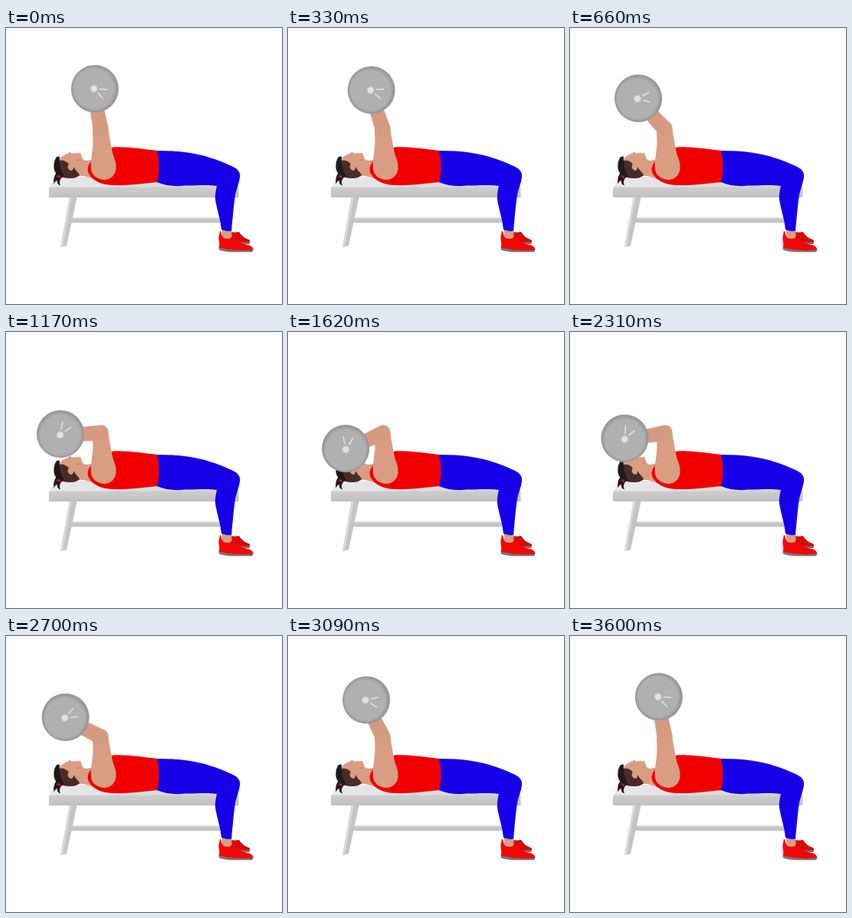
An HTML page that plays this animation: 360x360 px, repeating every 3630 ms.

```html
<!DOCTYPE html>
<html lang="en">
<head>
<meta charset="utf-8">
<title>Lying triceps extension</title>
<style>
html, body { margin: 0; width: 100%; height: 100%; overflow: hidden; background: #fff; }
svg { display: block; width: 100vw; height: 100vh; }
</style>
</head>
<body>
<svg viewBox="0 0 360 360">
  <defs>
    <linearGradient id="pad" x1="0" y1="0" x2="1" y2="0">
      <stop offset="0" stop-color="#e9e9e9"/><stop offset="1" stop-color="#d2d2d2"/>
    </linearGradient>
    <linearGradient id="edge" x1="0" y1="0" x2="0" y2="1">
      <stop offset="0" stop-color="#cdcdcd"/><stop offset="1" stop-color="#c0c0c0"/>
    </linearGradient>
  </defs>

  <g id="bench">
    <path fill="#c4c4c4" d="M84 247H281V254H84Z"/>
    <path fill="#dadada" d="M86 247H281V249H86Z"/>
    <path fill="#c4c4c4" d="M83 219H93L79 284L71 286Z"/>
    <path fill="#dadada" d="M83 219H86L74 285L71 286Z"/>
    <path fill="url(#pad)" d="M56 208L66 194H294L303 208Z"/>
    <path fill="url(#edge)" d="M56 207.500H303.500V221H56Z"/>
  </g>

  <g id="head">
    <path fill="#d99d82" d="M69 173C71 168 75 166 80 164L83.500 161.500L86 163.500L97 163L98.500 167L100 171C103 174 108 173 114 171L119 176L114 197C106 194 100 192 94 193L80 188Z"/>
    <path fill="#4a2c27" d="M69 173C75 172 80 174 82 178C79 180 81 186 86 186C88 184 88 182 89 181C89 185 94 187 96 192C92 196.500 82 197 75 195C69 191 66 180 69 173Z"/>
    <path fill="#1c1a1d" d="M66 189C62 193 62 199 62.500 203.500C64 200 65.500 199 67 199C66 202 68 204.500 71 205.500C69 201 70 197 74 194Z"/>
    <path fill="#1c1a1d" d="M66 168L70 167.500C69 178 71 186 77 194C70 196 64 191 62.500 183C62 177 63 172 66 168Z"/>
    <path fill="#d90d12" d="M67 191.500L71.500 193.500L70 196L66 194Z"/>
    <path d="M93 172.500L98 171.500" stroke="#b97a66" stroke-width=".8"/>
  </g>

  <path id="shirt" fill="#f20000" d="M109 177C112 172 116 171 119 168L139 155.500C157 154 178 158 203 160.500V201C184 201.500 163 206 141 205C125 205 113 199 108 190C106 186 106 181 109 177Z"/>

  <g id="shoes">
    <path fill="#d80b0b" d="M291 264C296 268 301 266 304 266C307 271 312 275 317 276C318.500 277 318.500 280 317 281L295 279Z"/>
    <path fill="#777" d="M303 279.500L318 279.500L317 282H303Z"/>
    <path fill="#d99d82" d="M282 261H294.500V277H282Z"/>
    <path fill="#777" d="M278 286C290 290 308 290 322.500 289L321 292.300H297C288 292.300 280 290.500 277.500 289Z"/>
    <path fill="#f20707" d="M279 264.500C282 266 280 272.500 285 274.500C290 275.500 293 275 295 271.500C301 277 306 281 313 282.500C320 283.500 322 286 322.500 289.500C308 291 290 290 277.500 286.500C280 281 276 276 278 270Z"/>
  </g>

  <path id="legs" fill="#1600e8" d="M197 160C211 160 224 160.700 237 162.500C257 165 277 172 293 179.500C302 183 306 188 305 195C304 203 300 211 298.500 221C296.500 236 295.500 250 294 264.500C290 265.500 285 264.500 281 263C279.500 246 274 235 272.800 221C273 215 274 210 275 206C259 204 246 206 233 205.500C221 207 208 206 197 201C201 187 200 173 197 160Z"/>

  <path id="upper" fill="#d99d82" d="M113 133C114 126 119 122 125 121.600C130.500 121.600 133.500 127 133.500 133C135.500 145 137.500 156 139.500 165C142 171 144 177 143.500 183C143 192 136 198 128 198C119 197 112 193 111 184C110 174 113 160 113.500 151Z"/>

  <g id="fore">
    <path fill="#d69a80" d="M-8.500 -46H8.500C8 -30 9.500 -14 10 0A10 10 0 0 1 -10 0C-10 -14 -10 -25 -8.500 -46Z"/>
    <g transform="translate(0 -53)">
      <circle cx="1.200" cy=".3" r="31" fill="#989898"/>
      <circle cx=".4" r="28.600" fill="#a6a6a6"/>
      <circle r="26.500" fill="#b0b0b0"/>
      <g stroke="#dedede" stroke-width="1.800" stroke-linecap="round">
        <path d="M8 0H17" transform="rotate(13)"/>
        <path d="M8 0H17" transform="rotate(57)"/>
      </g>
      <circle r="5" fill="#c8c8c8"/>
      <circle r="3.800" fill="#e2e2e2"/>
    </g>
  </g>
</svg>
<script>
const LOOP = 3630, STEP = 30;
const DOWN = 1710, UP = 1860, END = 3540;
const HIGH = 9.8, LOW = 114.8;
const fore = document.getElementById('fore');

// Ease in and out along the curve (.42, 0) - (.58, 1)
function ease(p) {
  if (p <= 0) return 0;
  if (p >= 1) return 1;
  let lo = 0, hi = 1, u = .5;
  for (let i = 0; i < 24; i++) {
    u = (lo + hi) / 2;
    const v = 1 - u;
    const x = 3 * v * v * u * .42 + 3 * v * u * u * .58 + u * u * u;
    if (x < p) lo = u; else hi = u;
  }
  return u * u * (3 - 2 * u);
}

function draw(ms) {
  const t = Math.floor((ms % LOOP) / STEP) * STEP;
  const bend = t < UP ? ease(t / DOWN) : 1 - ease((t - UP) / (END - UP));
  const angle = HIGH + (LOW - HIGH) * bend;
  fore.setAttribute('transform', `translate(123.700 131.500) rotate(${-angle})`);
}

const start = performance.now();
function tick() {
  draw(performance.now() - start);
  requestAnimationFrame(tick);
}
tick();
</script>
</body>
</html>
```
